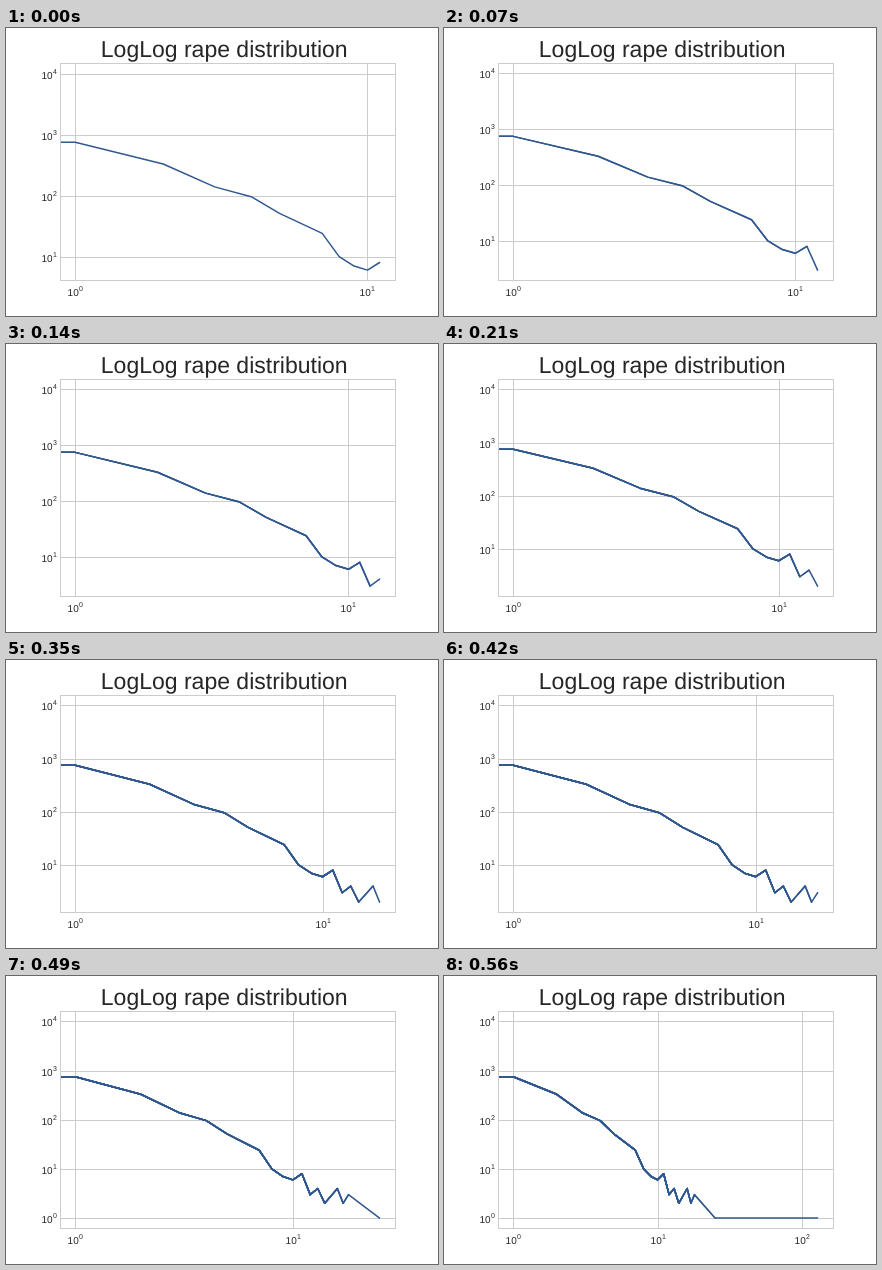
These frames come from a looping animation (432 by 288 pixels, 1330 ms). An HTML page:

```html
<!DOCTYPE html>
<html lang="en">
<head>
<meta charset="utf-8">
<title>LogLog distribution</title>
<style>
  html, body { margin: 0; width: 100%; height: 100%; overflow: hidden; background: #fff; }
  svg { display: block; font: 10px "Liberation Sans", Arial, sans-serif; fill: #262626; }
  text { text-rendering: geometricPrecision; }
  .title { font-size: 23px; text-anchor: middle; }
  .exp { font-size: 7px; }
  .rule { fill: none; stroke: #ccc; }
  .curve { fill: none; stroke: #30588f; stroke-width: 1.5; stroke-linejoin: round; stroke-linecap: round; }
</style>
</head>
<body>
<svg width="432" height="288" viewBox="0 0 432 288">
  <clipPath id="area"><rect x="54" y="35" width="335" height="217"/></clipPath>
  <text class="title" x="218.2" y="29">LogLog rape distribution</text>
  <g id="plot"></g>
  <rect class="rule" x="54.5" y="35.5" width="335" height="217"/>
</svg>
<script>
const data = [
  [1, 747], [2, 329], [3, 139], [4, 96], [5, 51], [7, 24], [8, 10], [9, 7], [10, 6], [11, 8],
  [12, 3], [13, 4], [14, 2], [16, 4], [17, 2], [18, 3], [25, 1], [128, 1]
];
const FIRST = 10, STEP = 70, LOOP = 1330;
const STEPS = data.length - FIRST;
const MAX_Y = Math.log10(10430);
const plot = document.getElementById("plot");

const label = (x, y, power) =>
  `<text x="${x}" y="${y}">10</text><text class="exp" x="${x + 11.5}" y="${y - 5}">${power}</text>`;
const rule = path => `<path class="rule" d="${path}"/>`;

function draw(step) {
  const shown = data.slice(0, FIRST + step);
  const maxX = Math.log10(shown.at(-1)[0]);
  const minY = Math.log10(Math.min(...shown.map(p => p[1])));
  // Both axes are logarithmic and fitted to the visible points.
  const px = power => 69.22 + 304.36 * power / maxX;
  const py = power => 44.44 + 197.68 * (MAX_Y - power) / (MAX_Y - minY);

  let out = "";
  for (let p = 0; p <= maxX; p++) {
    const x = Math.round(px(p));
    out += rule(`M${x + .5} 36V252`) + label(x - 7.4, 268, p);
  }
  for (let p = Math.ceil(minY); p <= MAX_Y; p++) {
    const y = Math.round(py(p));
    out += rule(`M54 ${y + .5}H389`) + label(35.5, y + 5, p);
  }

  const points = shown.map(([x, y]) => [px(Math.log10(x)), py(Math.log10(y))]);
  points.unshift([40, points[0][1]]);
  // Every step plots one more curve over the earlier ones.
  out += `<g clip-path="url(#area)">`;
  for (let n = FIRST + 1; n <= points.length; n++)
    out += `<polyline class="curve" points="${points.slice(0, n).join(" ")}"/>`;
  plot.innerHTML = out + "</g>";
}

let current = -1;
function tick() {
  const step = Math.min(STEPS, Math.floor(performance.now() % LOOP / STEP));
  if (step !== current) draw(current = step);
  requestAnimationFrame(tick);
}
tick();
</script>
</body>
</html>
```
